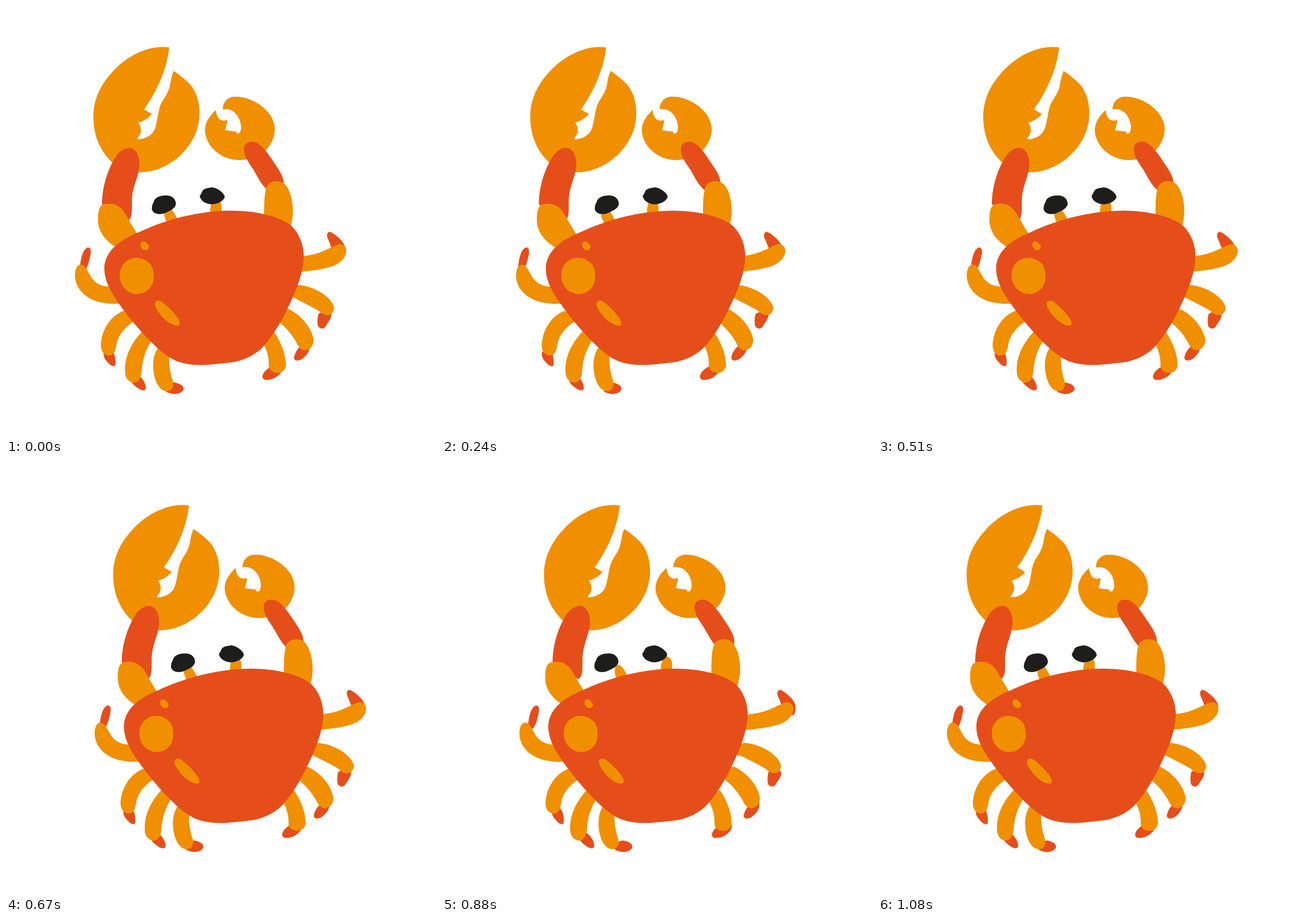
Animation of 748x748 px, one loop 1.11 s. Source, as an HTML page without scripts:

```html
<!DOCTYPE html>
<html lang="en">
<head>
<meta charset="utf-8">
<title>Swaying crab</title>
<style>
@property --t { syntax: "<number>"; inherits: true; initial-value: 0; }
html, body { margin: 0; width: 100%; height: 100%; overflow: hidden; background: #fff; }
svg { display: block; width: 100%; height: 100%; animation: clock 1110ms steps(33) -3ms infinite; }
@keyframes clock { from { --t: 5; } to { --t: 1115; } }

/* Each part eases right after its delay --d (ms), then back half a loop later. */
svg [style] {
  --out: clamp(0, (var(--t) - var(--d)) / 405, 1);
  --back: clamp(0, (var(--t) - var(--d) - 555) / 405, 1);
  transform: translateX(calc(17.2px * (cos(var(--back) * 180deg) - cos(var(--out) * 180deg))));
}
.o { fill: #f08f00; }
.r { fill: #e54e1b; }
.k { fill: #1d1e1c; }
</style>
</head>
<body>
<svg viewBox="0 0 748 748">
  <!-- claws and forearms -->
  <g style="--d:186">
    <path class="o" d="M284,72C250,67 210,86 184,116C162,140 152,166 152,193C152,225 164,255 188,275C205,288 228,290 240,289C270,287 300,268 318,243C332,223 337,203 336.500,184C336,162 329,146 319,135C311,127 302,120 292,113C287,122 287,132 284,143C280,156 272,163 268,174C265,183 264,195 261,207C258,222 247,231 230,232C227,231 229,229 231,227C237,219 235,208 230,203C240,200 248,195 254,188C249,185 245,182 240,180C262,150 280,110 284,72Z"/>
    <path class="o" d="M365,181C353,192 346,203 346,217C348,245 375,268 405,268C430,268 447,258 457,245C465,233 468,224 467.500,212C466,190 448,174 430,165C415,158 402,157 394,158C382,161 377,170 377,180C390,177 400,185 405,195C409,204 411,214 406,221C403,222 401,222 400,220L403,219L381,216C383,210 385,204 385,198C378,201 372,199 369,194C366,190 366,185 365,181Z"/>
    <path class="r" d="M214,247C226,247 233,261 232,279C230,300 219,315 219,340C219,355 220,372 211,374L190,360L167,345C167,310 180,278 193,259C200,251 207,247 214,247Z"/>
    <path class="r" d="M414,249C414,238 424,234 434,237C447,242 458,260 470,278C478,290 484,300 483,312L470,330L456,321C444,312 438,297 430,284C422,272 414,262 414,249Z"/>
    <path class="o" d="M275,360C275,352 279,348 284,350C289,353 294,362 299,372L303,380L285,385C280,377 275,368 275,360Z"/>
    <path class="o" d="M355,360C355,348 358,337 364,335C371,334 375,342 375,350V370H355Z"/>
  </g>

  <!-- upper arms -->
  <g class="o" style="--d:140">
    <path d="M160,371C160,355 163,347 170,345C185,341 198,347 206,359C213,371 220,383 228,396L235,420H192C172,408 160,392 160,371Z"/>
    <path d="M449,365C449,345 449,325 454,313C460,304 474,302 484,309C494,318 499,338 499,357C499,368 497,376 495,384L490,400L450,390Z"/>
  </g>

  <!-- leg tips -->
  <g class="r">
    <path style="--d:152" d="M128.500,455C130,438 134,423 142,420C148,420 148.500,426 147,433C145,443 143,452 138,459C134,463 129,461 128.500,455Z"/>
    <path style="--d:154" d="M170,604C172,597 180,596 185,600C190,606 191,616 190.500,624C189,628 184,627 180,623C173,616 169,611 170,604Z"/>
    <path style="--d:156" d="M218,652C221,644 227,640 232,643C239,650 244,658 243,666C241,670 235,669 230,665C224,661 219,657 218,652Z"/>
    <path style="--d:160" d="M278,670C280,660 287,654 294,655C303,657 310,661 309,667C305,675 294,676 287,674C283,673 280,672 278,670Z"/>
    <path style="--d:182" d="M558.500,400C558,393 563,391 568,395C577,401 586,409 589,417C591,426 590,434 586,437C576,436 568,425 564,415C562,408 559,405 558.500,400Z"/>
    <path style="--d:178" d="M543,537C545,532 562,528 566,537C566,545 558,553 555,559C551,562 546,562 543,557C541,550 542,543 543,537Z"/>
    <path style="--d:173" d="M501,611C503,602 508,595 515,590C520,586 526,585 528,589C530,600 522,609 515,614C508,618 501,618 501,611Z"/>
    <path style="--d:170" d="M446,644C447,638 453,632 460,628C470,624 480,624 481,629C481,638 472,645 465,648C457,651 446,653 446,644Z"/>
  </g>

  <!-- legs -->
  <g class="o">
    <path style="--d:103" d="M120,466C121,455 125,449 131,450C138,451 141,459 145,466C152,480 162,488 182,488L215,490L205,517C190,519 170,518 156,513C133,505 119,487 120,466Z"/>
    <path style="--d:106" d="M165,590C166,565 180,540 205,530L225,545L222,549C208,558 197,570 193,585C191,596 190,606 181,608C172,609 165,602 165,590Z"/>
    <path style="--d:113" d="M207,635C206,607 221,583 237,566L258,580L252,584C242,600 237,617 236,636C235,648 230,655 221,655C211,653 207,645 207,635Z"/>
    <path style="--d:115" d="M256,625C256,612 259,602 265,594L290,600L284,611C283,628 287,642 291,655C292,664 287,670 280,670C266,670 256,649 256,625Z"/>
    <path style="--d:138" d="M592,425C592,418 585,413 577,415C560,422 543,433 517,435L500,440L505,463L515,462C535,460 560,457 574,450C585,444 592,436 592,425Z"/>
    <path style="--d:135" d="M571,526C569,510 542,488 507,485L490,490L495,508L500,507C515,515 533,523 545,531C555,541 568,541 571,526Z"/>
    <path style="--d:127" d="M489,526C510,535 530,556 535,579C536,590 530,598 520,599C513,599 508,592 505,585C497,571 488,560 475,550L468,535Z"/>
    <path style="--d:120" d="M467,568C478,584 487,606 487,625C486,634 479,639 470,638C462,637 457,632 457,625C458,613 454,600 449,590L440,575Z"/>
  </g>

  <!-- shell -->
  <g style="--d:97">
    <path class="r" d="M171,456C172,425 200,406 230,394C280,370 340,356 392,356C440,356 480,368 497,383C512,398 518,418 518,436C517,470 500,505 488,530C475,556 460,580 444,596C430,609 412,617 392,620C370,622 355,625 335,624.500C312,624 297,619 284,611C275,605 264,596 252,584C233,565 212,540 196,517C182,497 171,478 171,456Z"/>
    <g class="o">
      <path d="M198,467C199,449 212,438 228,438C236,438 243,442 248,446C255,451 257,461 257,471C257,489 244,501 229,501C211,501 197,486 198,467Z"/>
      <path d="M234,414C235,408 242,408 245,413C250,416 250,421 246,424C241,426 238,424 236,421C234,418 234,416 234,414Z"/>
      <path d="M259,518C260,511 268,511 273,516C282,523 293,534 299,543C303,549 304,555 299,556C291,557 280,549 273,542C266,534 259,525 259,518Z"/>
    </g>
  </g>

  <!-- eyes -->
  <g class="k" style="--d:77">
    <path d="M254,350C254,345 257,342 258,338C261,332 270,329 280,329.500C290,330 296,337 295.500,345C294,352 286,356 279,359C272,363 262,363 257,359C254,356 253,353 254,350Z"/>
    <path d="M337,331C338,328 341,325 342,321C347,316 353,317 357,315.500C366,315 380,325 380.500,332C379,339 368,345 357,345C347,344 339,339 337,331Z"/>
  </g>
</svg>
</body>
</html>
```
